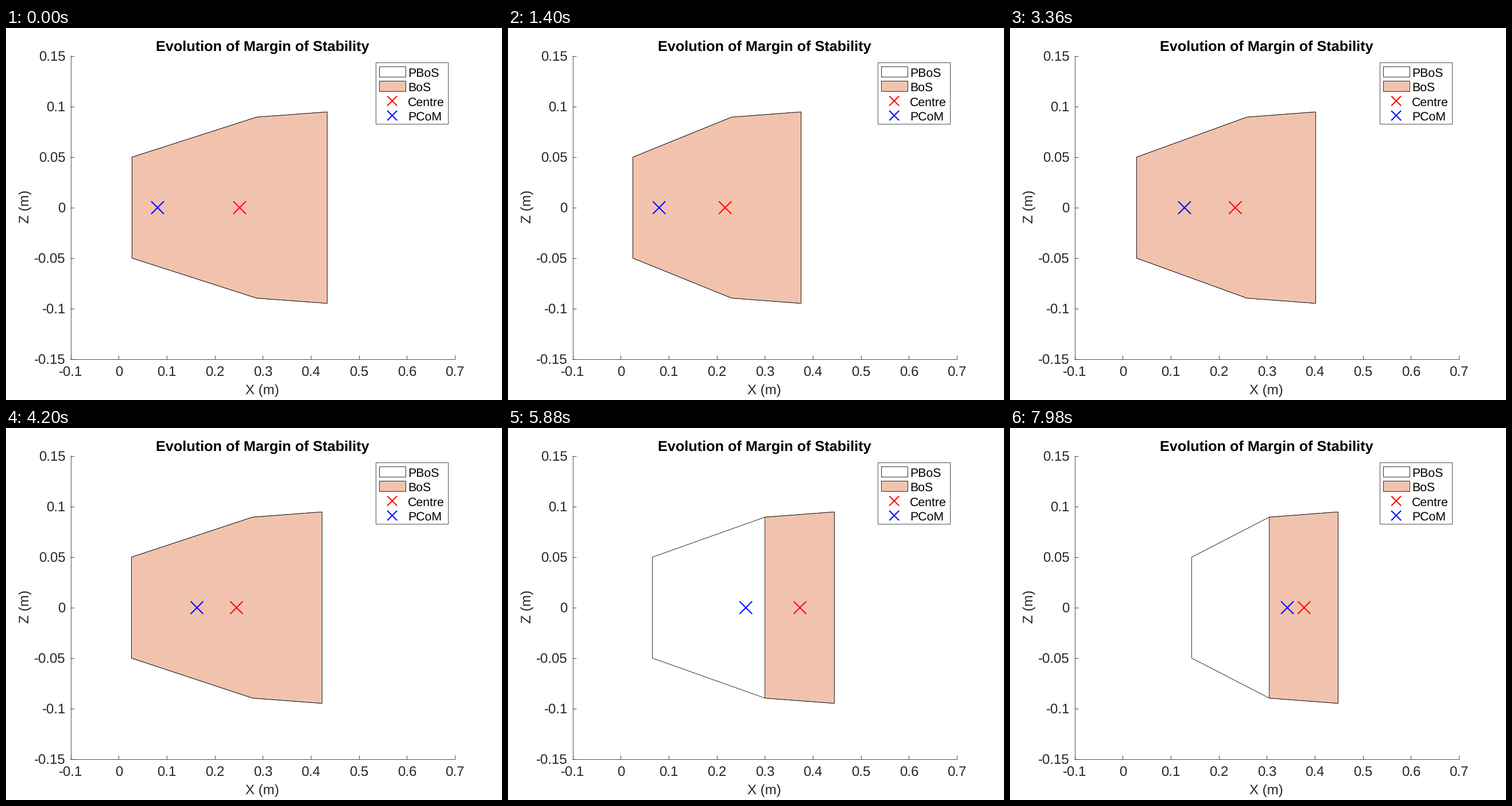
These frames come from a looping animation (864x648 px, 8000 ms). A matplotlib script:

```python
import numpy as np
import matplotlib.pyplot as plt
from matplotlib.animation import FuncAnimation
from matplotlib.patches import Polygon, Rectangle

plt.rcParams["font.family"] = "Liberation Sans"
plt.rcParams["text.hinting"] = "none"

W, H = 864, 648
TICK_MS, STEP_MS, LOOP_MS = 20, 140, 8000
INK, FILL = "#262626", "#f1c3af"
THIN = 0.8
X0, Y0, SX, SY = 196.3, 312.9, 836.6, 1760  # pixel origin and scale

# Key positions in pixels at the given steps
KEYS = np.array([0, 10, 24, 35, 42, 49, 57])
HEEL = np.array([219.5, 217.5, 220.5, 217.5, 251.3, 272, 316.3])
BALL = np.array([436, 389, 412.5, 441, 447.5, 449.5, 451.7])
TOE = np.array([559.5, 510, 532.7, 562.5, 568.4, 570.4, 571.8])
COM = np.array([264, 263.2, 304, 362.5, 414.3, 450.5, 483])
HEEL_OFF = 37
HALF = dict(heel=87.9, ball=157.6, toe=166.7)


def end_slope(h0, h1, d0, d1):
    return ((2 * h0 + h1) * d0 - h0 * d1) / (h0 + h1)


def glide(values, t):
    """Shape-preserving cubic through the key positions."""
    h = np.diff(KEYS)
    d = np.diff(values) / h
    m = np.zeros(len(KEYS))
    for i in range(1, len(d)):
        if d[i - 1] * d[i] > 0:
            a, b = 2 * h[i] + h[i - 1], h[i] + 2 * h[i - 1]
            m[i] = (a + b) / (a / d[i - 1] + b / d[i])
    m[0] = end_slope(h[0], h[1], d[0], d[1])
    m[-1] = end_slope(h[-1], h[-2], d[-1], d[-2])
    k = min(np.searchsorted(KEYS, t, side="right") - 1, len(h) - 1)
    s = (t - KEYS[k]) / h[k]
    return ((1 + 2 * s) * (1 - s) ** 2 * values[k]
            + s * (1 - s) ** 2 * h[k] * m[k]
            + s * s * (3 - 2 * s) * values[k + 1]
            + s * s * (s - 1) * h[k] * m[k + 1])


def outline(points):
    """Mirror (x, half height) points about the centre line."""
    top = [(np.floor(x) + 0.5, Y0 - z) for x, z in points]
    low = [(np.floor(x) + 0.5, Y0 + z) for x, z in points]
    return top + low[::-1]


def centroid(points):
    area = moment = 0
    for (x1, a), (x2, b) in zip(points, points[1:]):
        part = (x2 - x1) * (a + b) / 2
        area += part
        moment += part * (x1 + (x2 - x1) * (a + 2 * b) / (3 * (a + b)))
    return moment / area


fig = plt.figure(figsize=(W / 72, H / 72), dpi=72, facecolor="white")
ax = fig.add_axes([0, 0, 1, 1])
ax.set(xlim=(0, W), ylim=(H, 0))
ax.axis("off")


def line(xs, ys):
    ax.plot(xs, ys, color=INK, lw=THIN, solid_capstyle="butt")


def label(x, y, s, size=24, color=INK, **kw):
    ax.text(x, y, s, fontsize=size, color=color, va="baseline", **kw)


def cross(x, y, r, color, z=6):
    return ax.plot([x - r, x + r, np.nan, x - r, x + r],
                   [y - r, y + r, np.nan, y + r, y - r],
                   color=color, lw=2, solid_capstyle="butt", zorder=z)[0]


def box(x, y, w, h, color, edge="black"):
    ax.add_patch(Rectangle((x, y), w, h, fc=color, ec=edge, lw=THIN, zorder=4))


def region(color, z):
    return ax.add_patch(Polygon([(0, 0)] * 3, fc=color, ec="black",
                                lw=THIN, zorder=z))


# Axes, ticks and labels
line([112.5, 112.5], [48, 577])
line([112, 782], [576.5, 576.5])
for i in range(-1, 8):
    x = X0 + i * 0.1 * SX
    line([x, x], [577, 570])
    label(x, 607, f"{i / 10:g}", ha="center")
for i in range(-3, 4):
    y = Y0 - i * 0.05 * SY
    line([112, 119], [y, y])
    label(103.8, y + 8.5, f"{i * 0.05:.2g}", ha="right")
label(446.5, 638, "X (m)", ha="center")
label(40.3, 311.5, "Z (m)", 24.3, ha="center",
      rotation=90, rotation_mode="anchor")
label(446.6, 40, "Evolution of Margin of Stability", 25.25, "black",
      ha="center", weight="bold")

# Legend
box(643.5, 59.5, 126, 107, "white", INK)
box(649.5, 66.5, 46, 18, "white")
box(649.5, 91.5, 46, 18, FILL)
cross(672.7, 127, 8.5, "red")
cross(672.7, 152.5, 8.5, "blue")
for i, name in enumerate(["PBoS", "BoS", "Centre", "PCoM"]):
    label(700, 84.5 + 25.5 * i, name, 21.2, "black", zorder=6)

# Moving parts
foot = region("white", 3)
base = region(FILL, 4)
centre = cross(0, Y0, 11, "red")
com = cross(0, Y0, 11, "blue", 7)


def move(mark, x, r=11):
    mark.set_xdata([x - r, x + r, np.nan, x - r, x + r])


def update(frame):
    step = frame * TICK_MS // STEP_MS
    shape = [(glide(HEEL, step), HALF["heel"]),
             (glide(BALL, step), HALF["ball"]),
             (glide(TOE, step), HALF["toe"])]
    support = shape if step < HEEL_OFF else shape[1:]
    foot.set_xy(outline(shape))
    base.set_xy(outline(support))
    move(centre, centroid(support))
    move(com, glide(COM, step))
    return foot, base, centre, com


anim = FuncAnimation(fig, update, frames=LOOP_MS // TICK_MS,
                     interval=TICK_MS, repeat=True, repeat_delay=0)
plt.show()
```
